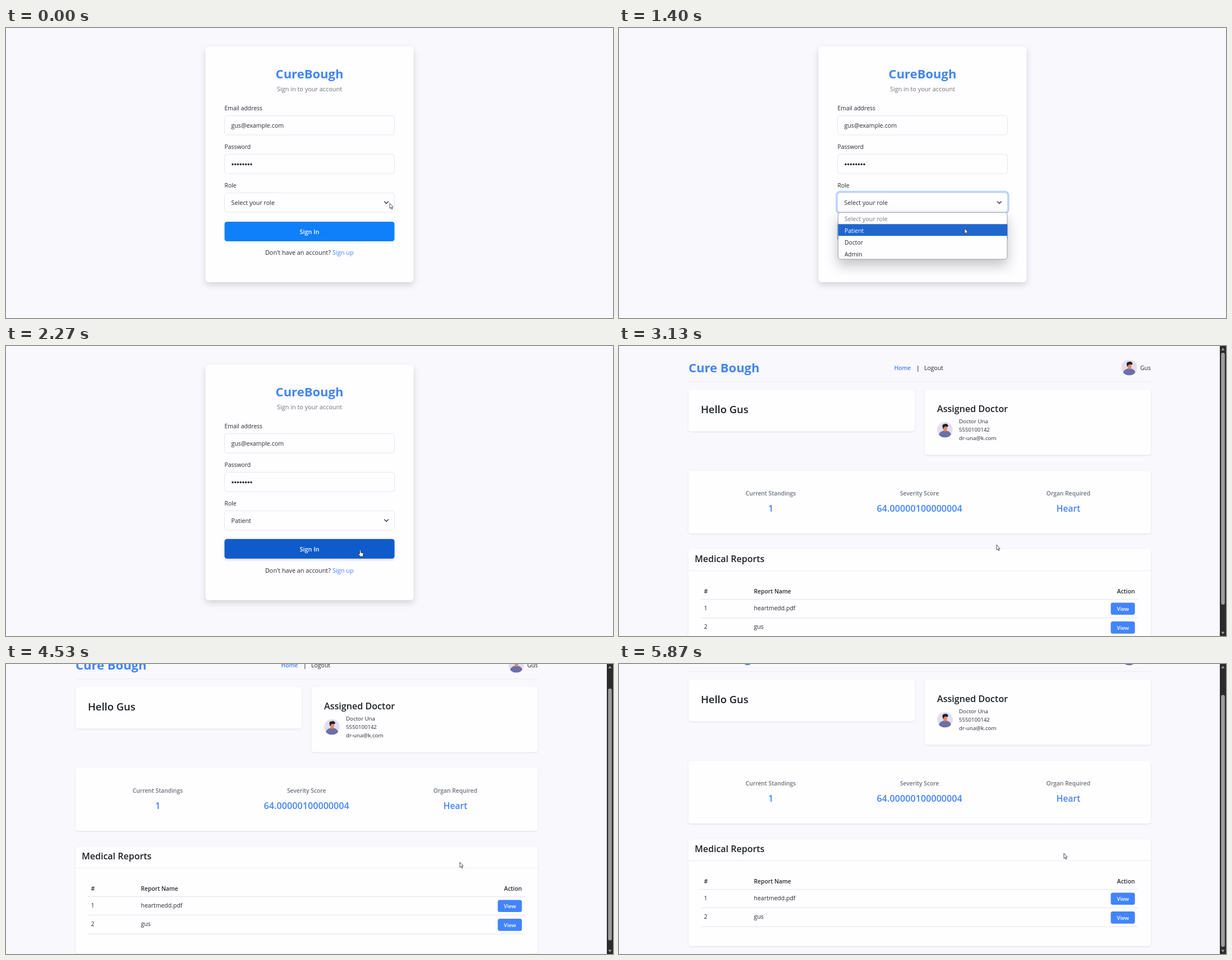
Animation of 1082x518 px, one loop 5.94 s. Source, as an HTML page:

```html
<!DOCTYPE html>
<html lang="en">
<head>
<meta charset="utf-8">
<title>Sign in and dashboard</title>
<style>
html, body { margin: 0; width: 100%; height: 100%; overflow: hidden; background: #f9f8fd; }
svg { display: block; font-family: "Open Sans", "Noto Sans", sans-serif; }
.panel { fill: #fefdff; }
.big { filter: drop-shadow(0 5px 6px rgba(0,0,0,.15)); }
.small { filter: drop-shadow(0 1.5px 1.5px rgba(0,0,0,.1)); }
.field { fill: #fefdff; stroke: #e5e6ee; }
.menu { filter: drop-shadow(0 11px 11px rgba(0,0,0,.23)); }
.rule { stroke: #e3e4e9; }
.faint { stroke: #ececf1; }
</style>
</head>
<body>
<svg id="stage" width="1082" height="518" viewBox="0 0 1082 518"></svg>
<script>
const LOOP = 5940, BLUE = '#4285f4', INK = '#24292e', DARK = '#1d2126', GREY = '#6c737b';
const OPEN = 330, CLOSE = 1560, CLICK = 2130, SWITCH = 2600;
const SCROLL_START = 4230, SCROLL_TIME = 455, SCROLL_MAX = 50;

const text = (x, y, size, str, fill = INK, weight = 400, anchor = 'start') =>
  `<text x="${x}" y="${y}" font-size="${size}" fill="${fill}" font-weight="${weight}" text-anchor="${anchor}">${str}</text>`;
const mid = (x, y, size, str, fill, weight) => text(x, y, size, str, fill, weight, 'middle');
const rect = (x, y, w, h, r, attrs) =>
  `<rect x="${x}" y="${y}" width="${w}" height="${h}" rx="${r}" ${attrs}/>`;
const rule = (x1, x2, y, kind = 'rule') => `<path class="${kind}" d="M${x1} ${y}H${x2}"/>`;
const card = (x, y, w, h) => rect(x, y, w, h, 5, 'class="panel small"');
const field = (label, y) => text(389.5, y - 9.3, 10.4, label) + rect(389.5, y + .5, 303, 34.5, 4.5, 'class="field"');

const avatar = (x, y) => `<g transform="translate(${x} ${y})" clip-path="url(#round)">
  <circle r="14" fill="#e5ddec"/>
  <path d="M-12 14Q-11 3-3 2H4Q11 3 12 14Z" fill="#6a70a8"/>
  <path d="M-2.5-2H3V2Q0 5-2.5 2Z" fill="#d9785f"/>
  <ellipse cx=".7" cy="-3" rx="3.4" ry="4.4" fill="#e58a6c"/>
  <path d="M-4-3Q-6-10-1-10Q2-12 5-9Q7-6 4-5Q0-7-2-4L-3-1Z" fill="#20202c"/></g>`;

const stat = (x, label, value, size) =>
  mid(x, 267, 10.3, label, GREY, 600) + mid(x, 296, size, value, BLUE, 600);

const report = (y, n, name) => text(151.5, y + 19.5, 10.5, n) + text(240.5, y + 19.5, 10.5, name) +
  rect(876.6, y + 6.4, 43, 21.6, 3.5, 'fill="#4284fb"') + mid(898.3, y + 21, 9.5, 'View', '#fff', 600) +
  rule(146, 925, y + 33.5);

const login = `<g id="login">
  ${rect(355.5, 33, 371, 421, 6, 'class="panel big"')}
  ${mid(541, 89.5, 22, 'CureBough', BLUE, 700)}
  ${mid(541, 113, 10.9, 'Sign in to your account', GREY)}
  ${field('Email address', 156)}${text(401.5, 178.3, 10.65, 'gus@example.com')}
  ${field('Password', 225)}
  <path d="M404 243.5h33.5" stroke="${INK}" stroke-width="3.6" stroke-linecap="round" stroke-dasharray="0 4.72"/>
  ${field('Role', 294)}
  ${rect(388, 292.5, 306, 38, 6, 'id="ring" fill="none" stroke="#bdd4fb" stroke-width="3.5"')}
  <text id="role" x="401.5" y="316" font-size="10.75" fill="${INK}"></text>
  <path d="M674.5 310l3.5 3.5 3.5-3.5" fill="none" stroke="#343a40" stroke-width="1.5" stroke-linecap="round"/>
  <g id="button">${rect(389.5, 346, 303, 35, 4.5, 'id="face"')}
    ${mid(541, 368, 10.8, 'Sign In', '#fff', 600)}</g>
  ${text(462, 405.3, 10.8, "Don't have an account?")}${text(582, 405.3, 10.9, 'Sign up', BLUE)}
  <g id="menu" class="menu">
    ${rect(390.5, 329.5, 301.5, 83.5, 4, 'fill="#fefdff" stroke="#8b8d93" stroke-width=".8"')}
    ${rect(391, 350.3, 301, 21, 0, 'id="hover" fill="#1f66cd"')}
    ${text(402, 345, 10.65, 'Select your role', '#777')}
    <text id="patient" x="402" y="366" font-size="10.4">Patient</text>
    ${text(402, 387, 10.4, 'Doctor')}${text(402, 408, 10.4, 'Admin')}
  </g></g>`;

const home = `<g id="home"><g id="page">
  ${text(124, 47.3, 22, 'Cure Bough', BLUE, 700)}
  ${text(490.5, 43, 10.3, 'Home', BLUE, 600)}${mid(533, 43, 10.5, '|', INK, 600)}${text(544, 43, 10.5, 'Logout', INK, 500)}
  ${avatar(909.5, 38.5)}${text(929, 43, 10.4, 'Gus', INK, 500)}
  ${rule(124, 948, 63.5, 'faint')}
  ${card(123.5, 78, 404, 74.5)}${text(146, 120.3, 18.4, 'Hello Gus', DARK, 600)}
  ${card(544.5, 78, 403.5, 116.5)}${text(567, 117.8, 16.1, 'Assigned Doctor', DARK, 600)}
  ${avatar(581, 149.5)}
  ${text(606, 138, 9.75, 'Doctor Una')}${text(606, 153, 9.6, '5550100142')}${text(606, 168.3, 9.75, 'dr-una@k.com')}
  ${card(123.5, 223, 824.5, 112)}
  ${stat(270.5, 'Current Standings', '1', 16.2)}
  ${stat(535.7, 'Severity Score', '64.00000100000004', 16.2)}
  ${stat(801, 'Organ Required', 'Heart', 15.6)}
  ${card(123.5, 363, 824.5, 191)}
  ${text(135, 386.3, 16, 'Medical Reports', DARK, 600)}${rule(124, 948, 401.5, 'faint')}
  ${text(151.5, 442.3, 10.3, '#', INK, 600)}${text(240.5, 442.3, 10.3, 'Report Name', INK, 600)}
  ${text(919.5, 442.3, 10.3, 'Action', INK, 600, 'end')}${rule(146, 925, 452.5)}
  ${report(452, 1, 'heartmedd.pdf')}${report(485.7, 2, 'gus')}
  </g>
  ${rect(1071, 0, 11, 518, 0, 'fill="#2b2b2c"')}
  ${rect(1073.3, 12, 6.6, 450, 3.3, 'id="thumb" fill="#9d9d9e"')}
  <path d="M1073.5 7.8l3-4.5 3 4.5zM1073.5 510.5l3 4.5 3-4.5z" fill="#9d9d9e"/></g>`;

const cursors = `<g id="cursor" stroke-linejoin="round">
  <path id="arrow" d="M0 0V9.3L2.1 7.4 3.6 10.7 5 10.1 3.5 6.9H6.2Z" fill="#fff" stroke="#3b3b40" stroke-width=".9"/>
  <path id="hand" d="M-1.1 7V1A1.1 1.1 0 0 1 1.1 1V4.4L4.6 5.2Q5.8 5.6 5.6 7L4.7 11.6H.2L-2.9 8Q-3.2 6.4-1.9 6.5Z" fill="#fff" stroke="#2a2a30" stroke-width=".9"/></g>`;

document.getElementById('stage').innerHTML =
  '<clipPath id="round"><circle r="14"/></clipPath>' + login + home + cursors;
const $ = id => document.getElementById(id);
const show = (id, on) => $(id).setAttribute('display', on ? 'inline' : 'none');

const ramp = (t, start, length) => Math.min(1, Math.max(0, (t - start) / length));
const ease = p => p * p * (3 - 2 * p);
const mix = (a, b, p) => a + (b - a) * p;

// Pointer stops: time, x, y
const stops = [
  [0, 684, 313], [600, 684, 313], [1150, 617, 357], [1400, 616, 358], [1700, 616, 358],
  [2050, 631.5, 364.5], [2550, 631.5, 364.5], [3130, 673, 355],
  [3950, 809, 354], [5000, 809, 354], [5700, 793, 338], [LOOP, 793, 338]
];
function pointer(t) {
  const i = Math.max(1, stops.findIndex(s => s[0] > t));
  const [t0, x0, y0] = stops[i - 1], [t1, x1, y1] = stops[i];
  const p = ease(ramp(t, t0, t1 - t0));
  return [mix(x0, x1, p), mix(y0, y1, p)];
}

function draw(t) {
  const [x, y] = pointer(t);
  const signedIn = t >= SWITCH, chosen = t >= CLOSE;
  const open = t >= OPEN && !chosen, over = open && y > 350;
  const lift = ease(ramp(t, CLOSE, 200));

  show('login', !signedIn);
  show('home', signedIn);
  show('menu', open);
  show('hover', over);
  $('patient').setAttribute('fill', over ? '#fff' : INK);
  $('role').textContent = chosen ? 'Patient' : 'Select your role';
  $('ring').setAttribute('opacity', ramp(t, OPEN - 80, 120) - ramp(t, CLICK, 120));

  const from = [16, 127, 250], to = [15, 91, 203];
  $('face').setAttribute('fill', `rgb(${from.map((c, i) => Math.round(mix(c, to[i], lift)))})`);
  $('button').setAttribute('transform', `translate(0 ${-1.2 * lift})`);
  $('button').style.filter = lift ? `drop-shadow(0 2px 2px rgba(0,0,0,${.17 * lift}))` : 'none';

  const scroll = ease(ramp(t, SCROLL_START, SCROLL_TIME)) * SCROLL_MAX;
  $('page').setAttribute('transform', `translate(0 ${-Math.round(scroll)})`);
  $('thumb').setAttribute('y', 12 + scroll * .866);

  const hand = chosen && !signedIn;
  show('hand', hand);
  show('arrow', !hand);
  $('cursor').setAttribute('transform', `translate(${x} ${y})`);
}

const begin = performance.now();
function tick() {
  draw((performance.now() - begin) % LOOP);
  requestAnimationFrame(tick);
}
tick();
</script>
</body>
</html>
```
